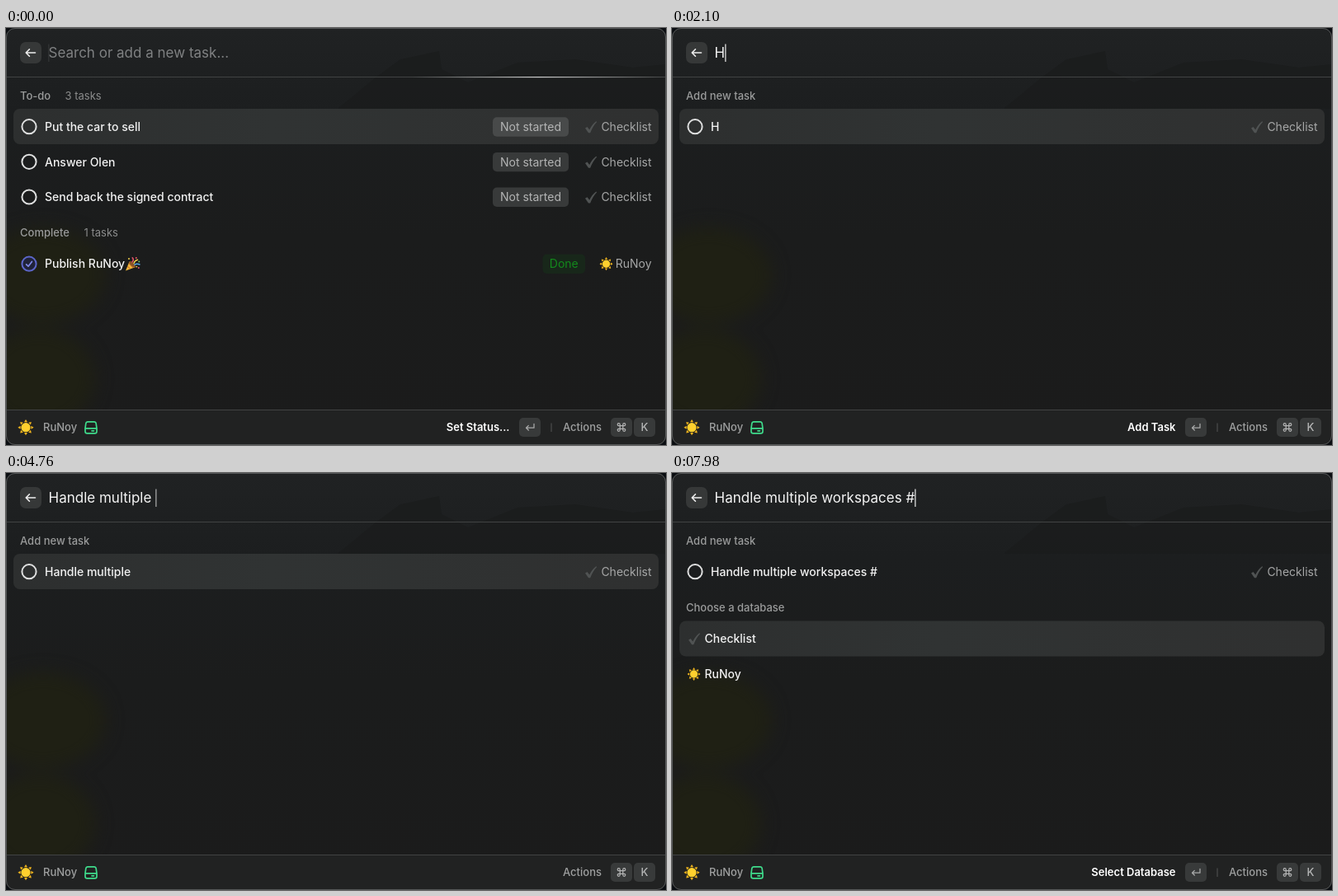
Write an HTML page that moves like this. It is 800 by 506 pixels and loops after 8 s.

```html
<!DOCTYPE html>
<html lang="en">
<head>
<meta charset="utf-8">
<title>Task list</title>
<style>
html, body { margin: 0; width: 100%; height: 100%; overflow: hidden; background: #0a0d11; }
svg { display: block; width: 800px; height: 506px; }
text { font-family: Inter, "Noto Sans", sans-serif; font-size: 14px; font-weight: 500; fill: #f2f2f2; white-space: pre; }
.label { font-size: 13px; fill: #9a9b9b; }
.count { font-size: 13px; font-weight: 400; fill: #8b8c8c; }
.side { font-weight: 400; fill: #a6a7a7; }
.foot { font-size: 13px; fill: #9fa0a0; }
.big { font-size: 17px; font-weight: 400; }
.end { text-anchor: end; }
.mid { text-anchor: middle; }
.line { fill: none; stroke-linecap: round; stroke-linejoin: round; }
</style>
</head>
<body>
<svg viewBox="0 0 800 506">
  <defs>
    <linearGradient id="sky" x1="0" y1="0" x2="0" y2="1">
      <stop offset="0" stop-color="#202223"/>
      <stop offset=".2" stop-color="#1c1e1f"/>
      <stop offset=".5" stop-color="#1b1c1c"/>
      <stop offset="1" stop-color="#1b1b1b"/>
    </linearGradient>
    <linearGradient id="glow">
      <stop offset="0" stop-color="#fff" stop-opacity="0"/>
      <stop offset=".5" stop-color="#fff" stop-opacity=".75"/>
      <stop offset="1" stop-color="#fff" stop-opacity="0"/>
    </linearGradient>
    <linearGradient id="rowFill">
      <stop offset="0" stop-color="#2d2f2f"/>
      <stop offset=".4" stop-color="#303333"/>
      <stop offset="1" stop-color="#2f3030"/>
    </linearGradient>
    <filter id="soft" x="-50%" y="-50%" width="200%" height="200%" color-interpolation-filters="sRGB">
      <feGaussianBlur stdDeviation="10"/>
    </filter>
    <clipPath id="win"><rect width="800" height="506" rx="11"/></clipPath>

    <path id="check" d="M1 8.5L3.6 7L6.2 10.5Q9.5 3.5 14.2 .2L15.2 1Q10.3 6 7.2 14.2H5Z" fill="#505353"/>
    <circle id="ring" r="8.6" fill="none" stroke="#dedfdf" stroke-width="2"/>
    <g id="sun"><g id="rays" fill="#f2b51d"></g><circle r="5" fill="#ffd02e"/></g>
    <rect id="key" width="26" height="23" rx="5" fill="#383a3a"/>
  </defs>

  <g clip-path="url(#win)">
    <rect width="800" height="506" fill="url(#sky)"/>
    <g filter="url(#soft)" fill="#1f2014">
      <ellipse cx="45" cy="300" rx="76" ry="58"/>
      <ellipse cx="40" cy="425" rx="68" ry="60"/>
    </g>
    <path d="M402 98L448 60L478 38L525 28L528 50L560 66L620 42L690 38L760 48L800 44V98Z" fill="#1b1c1c" opacity=".7"/>
    <rect y="463" width="800" height="43" fill="#212222"/>
    <path d="M0 59.5H800M0 463.5H800" stroke="#414343"/>
    <rect id="bar" y="59" width="310" height="1.2" fill="url(#glow)"/>
  </g>
  <rect x=".5" y=".5" width="799" height="505" rx="10.5" fill="none" stroke="#535556"/>

  <rect x="17" y="17" width="26" height="26" rx="7" fill="#363838"/>
  <path class="line" d="M35.5 30H24.2M28.4 25.8L24.2 30L28.4 34.2" stroke="#eee" stroke-width="1.6"/>
  <text class="big" id="input" x="51.5" y="36.3"></text>
  <rect id="caret" y="19.5" width="1.6" height="21.5" fill="#b9baba"/>

  <rect id="select" x="9" width="782" height="43" rx="8" fill="url(#rowFill)"/>
  <g id="home"></g>
  <g id="add"></g>
  <g id="pick"></g>

  <use href="#sun" transform="translate(24 484.7) scale(1.12)"/>
  <text class="foot" x="45" y="489.3">RuNoy</text>
  <path class="line" stroke="#3fdc8c" stroke-width="1.7"
    d="M96 485.8L96.8 480Q97.1 477.8 99.3 477.8H106.7Q108.9 477.8 109.2 480L110 485.8V489.4Q110 491.8 107.6 491.8H98.4Q96 491.8 96 489.4ZM96.3 485.8H109.7M104 488.8H106.5"/>
  <g id="action">
    <text class="foot end" id="verb" x="610.5" y="489.3" style="fill:#fff;font-weight:600"></text>
    <use href="#key" x="622" y="473"/>
    <path class="line" d="M640 480.5V485.2H630.5M633.3 482.4L630.5 485.2L633.3 488" stroke="#a8a9a9" stroke-width="1.3"/>
    <path d="M661 479.5V490" stroke="#434545" stroke-width="1.5"/>
  </g>
  <text class="foot end" x="722" y="489.3">Actions</text>
  <use href="#key" x="733" y="473"/>
  <use href="#key" x="761" y="473"/>
  <path class="line" transform="translate(746 484.5)" stroke="#b4b5b5" stroke-width="1.2"
    d="M-1.8 -1.8H1.8V1.8H-1.8ZM-1.8 -1.8H-3.3A1.5 1.5 0 1 1 -1.8 -3.3ZM1.8 -1.8V-3.3A1.5 1.5 0 1 1 3.3 -1.8ZM1.8 1.8H3.3A1.5 1.5 0 1 1 1.8 3.3ZM-1.8 1.8V3.3A1.5 1.5 0 1 1 -3.3 1.8Z"/>
  <text class="foot mid" x="774" y="489.2" style="fill:#b4b5b5">K</text>
</svg>
<script>
const $ = id => document.getElementById(id);
const LOOP = 8000;
const LIST = 'Checklist', DAY = 'RuNoy';

const label = (y, s) => `<text class="label" x="17" y="${y + 4.5}">${s}</text>`;
const count = (x, y, s) => `<text class="count" x="${x}" y="${y + 4.5}">${s}</text>`;
const title = (y, s, x = 47) => `<text x="${x}" y="${y + 5}">${s}</text>`;
const side = (y, s) => `<text class="side end" x="782.5" y="${y + 5}">${s}</text>`;
const ring = y => `<use href="#ring" x="28" y="${y - .3}"/>`;
const check = (x, y) => `<use href="#check" x="${x}" y="${y - 7}"/>`;
const sun = (x, y) => `<use href="#sun" transform="translate(${x} ${y}) scale(.94)"/>`;
const tag = (x, y, w, s, fill, ink) =>
  `<rect x="${x}" y="${y - 11.7}" width="${w}" height="23.4" rx="5" fill="${fill}"/>` +
  `<text class="mid" x="${x + w / 2}" y="${y + 5}" style="font-weight:400;fill:${ink}">${s}</text>`;
const todo = (y, s, fill) => ring(y) + title(y, s) + tag(590, y, 92, 'Not started', fill, '#b3b4b4') +
  check(701, y) + side(y, LIST);

const popper = `<g transform="translate(145 278)">
  <path d="M0 16.5L4.6 5.5Q10 7.5 11.6 12.3Z" fill="#f3b83a"/>
  <path d="M2.2 11.2L5.6 14.4M3.9 7.4L9 13" stroke="#c9702c" stroke-width="1.1"/>
  <ellipse cx="8.1" cy="8.9" rx="2" ry="4.8" transform="rotate(-45 8.1 8.9)" fill="#8a5325"/>
  <g class="line" stroke-width="1.5">
    <path d="M8 6Q10.5 3.5 8.2 .8" stroke="#e8556a"/>
    <path d="M10 7.5Q11 4 14.5 3.2" stroke="#f2cf4a"/>
    <path d="M11 9.2Q13.5 7.4 17 9" stroke="#58a8e8"/>
  </g>
  <g fill="#e8556a"><circle cx="12.8" cy="1" r="1"/><circle cx="15.8" cy="13" r="1"/></g>
  <g fill="#f2cf4a"><circle cx="4" cy="2" r="1"/><circle cx="13.3" cy="11.6" r=".9"/></g>
  <circle cx="16.3" cy="5.6" r="1" fill="#7cc76a"/></g>`;

$('rays').innerHTML = Array.from({ length: 8 }, (_, i) =>
  `<path d="M-1.8 -5.7H1.8L0 -8.6Z" transform="rotate(${i * 45})"/>`).join('');

$('home').innerHTML = label(82, 'To-do') + count(71.5, 82, '3 tasks') +
  todo(120, 'Put the car to sell', '#484a4a') +
  todo(162.6, 'Answer Olen', '#383a3a') +
  todo(205.3, 'Send back the signed contract', '#383a3a') +
  label(248, 'Complete') + count(94.5, 248, '1 tasks') +
  `<circle cx="28" cy="286.2" r="8.6" fill="#20233a" stroke="#5c66c9" stroke-width="2"/>
   <path class="line" d="M24.6 286.8L27 289.2L31.4 283.4" stroke="#7f88e6" stroke-width="1.7"/>` +
  title(286.2, 'Publish ' + DAY) + popper +
  tag(650.5, 286.2, 51.5, 'Done', '#18271a', '#138a1c') + sun(727.5, 286.2) + side(286.2, DAY);

$('add').innerHTML = label(82, 'Add new task') + ring(120) + title(120, '') +
  check(701, 120) + side(120, LIST);
const draft = $('add').querySelector('text:not([class])');

$('pick').innerHTML = label(163, 'Choose a database') + check(19, 201) + title(201, LIST, 39.5) +
  sun(26.5, 244) + title(244, DAY, 39.5);

// [text, time of first key, gap between keys]
const keys = [
  ['H', 1960, 0], ['andl', 2170, 140], ['e m', 2800, 140], ['ultiple ', 3150, 80],
  ['workspa', 5670, 55], ['ces ', 6160, 180], ['#', 7770, 0]
].flatMap(([s, at, gap]) => [...s].map((c, i) => ({ c, at: at + i * gap })));
const START = keys[0].at, PICK = 7830;

// The caret stays lit after a key, then fades out and in.
function blink(t, last) {
  const age = last === undefined ? t + 250 : t - last - 450;
  if (age < 0) return 1;
  const p = age % 980;
  if (p < 280) return 1 - p / 280;
  if (p < 550) return 0;
  return Math.min(1, .6 + .4 * (p - 550) / 210);
}

const show = (id, on) => { $(id).style.display = on ? '' : 'none'; };

function draw(t) {
  const hit = keys.filter(k => k.at <= t);
  const typed = hit.map(k => k.c).join('');
  const home = t < START, pick = t >= PICK;
  const input = $('input');

  input.textContent = typed || 'Search or add a new task...';
  input.style.fill = typed ? '#f4f4f4' : '#7f8182';
  $('caret').setAttribute('x', typed ? 51.4 + input.getComputedTextLength() : 51);
  $('caret').setAttribute('opacity', blink(t, hit.at(-1)?.at));

  show('home', home);
  show('add', !home);
  show('pick', pick);
  draft.textContent = typed.trim();
  $('select').setAttribute('y', pick ? 179.5 : 98);

  // A trailing space leaves the row without its action.
  show('action', home || !typed.endsWith(' '));
  $('verb').textContent = home ? 'Set Status...' : pick ? 'Select Database' : 'Add Task';

  show('bar', home);
  $('bar').setAttribute('x', (t + 800) % 1120 - 310);
}

function loop() {
  draw(performance.now() % LOOP);
  requestAnimationFrame(loop);
}
draw(0);
requestAnimationFrame(loop);
</script>
</body>
</html>
```
